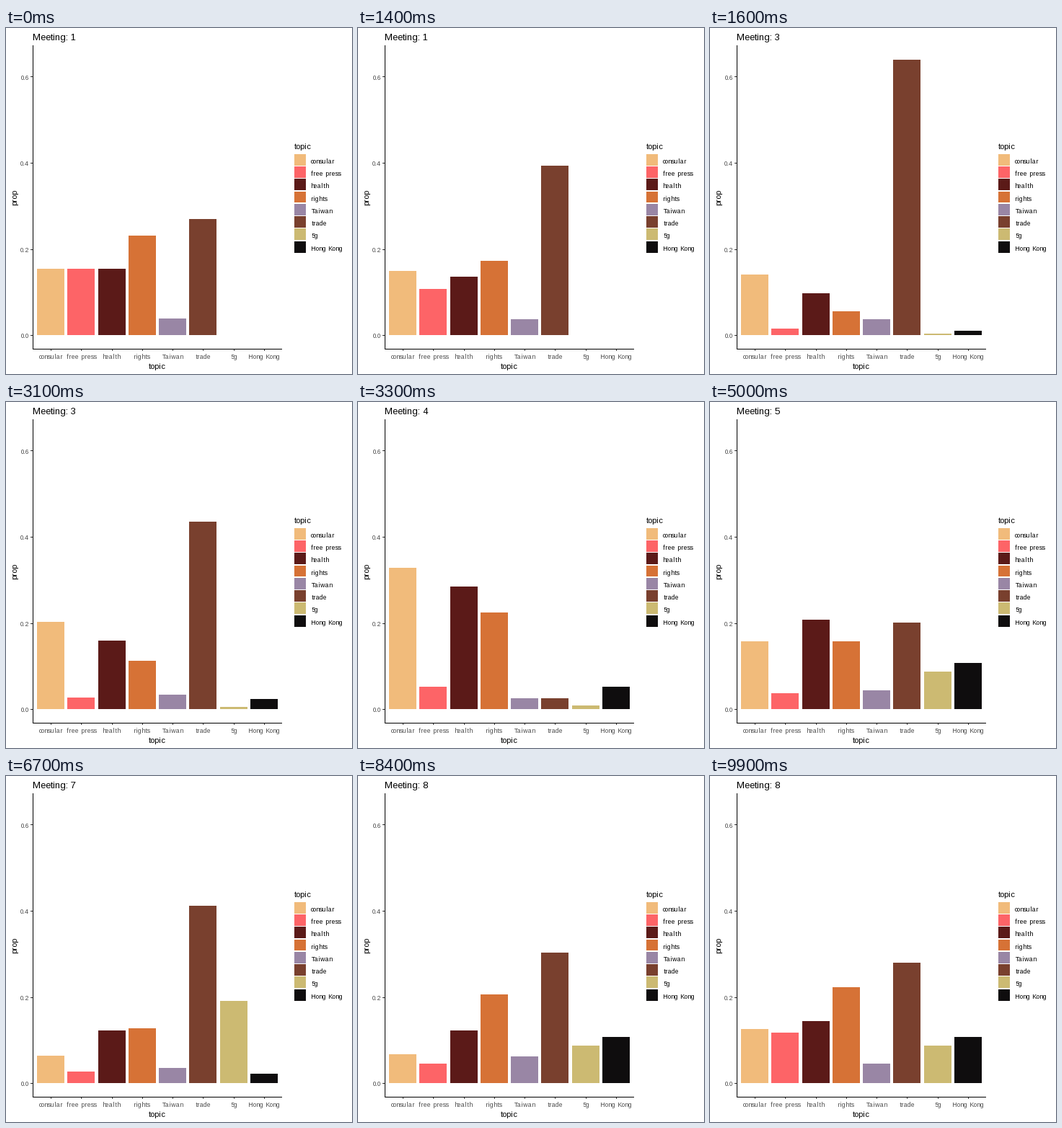
A matplotlib script for the animation above (10000 ms loop, 480x480 px).

```python
import numpy as np
import matplotlib as mpl
import matplotlib.pyplot as plt
from matplotlib.animation import FuncAnimation
from matplotlib.patches import Rectangle

mpl.rcParams.update({
    "toolbar": "None",
    "font.family": "Liberation Sans",
    "text.hinting": "force_autohint",
    "text.hinting_factor": 1,
    "text.kerning_factor": 6,
})

SIZE, DPI = 480, 100
FRAMES, INTERVAL = 100, 100
CYCLE, MOVE = 17, 3           # frames per meeting, frames per transition
ZERO, UNIT = 426.1, 597.7     # pixel row of prop 0, pixels per unit
BASE = round(ZERO)
LEFT, RIGHT, TOP, BOTTOM = 37, 383, 24, 445
FIRST, PITCH, WIDTH = 43.2, 42.24, 38
AXIS_TEXT, TICK = "#4d4d4d", "#333333"

TOPICS = {
    "consular": "#f1bb7b",
    "free press": "#fd6467",
    "health": "#5b1a18",
    "rights": "#d67236",
    "Taiwan": "#9986a5",
    "trade": "#79402e",
    "5g": "#ccba72",
    "Hong Kong": "#0f0d0e",
}

# Shares per thousand; the last topic takes whatever is left.
SHARES = {
    1: (154, 154, 154, 231, 38, 269, 0),
    3: (141, 15, 97, 56, 37, 640, 4),
    4: (328, 52, 284, 224, 26, 26, 8),
    5: (158, 37, 208, 158, 44, 201, 87),
    7: (63, 27, 123, 127, 35, 412, 191),
    8: (67, 45, 123, 206, 62, 303, 87),
}
MEETINGS = list(SHARES)
PROPS = np.array([(*s, 1000 - sum(s)) for s in SHARES.values()]) / 1000

fig = plt.figure(figsize=(SIZE / DPI, SIZE / DPI), dpi=DPI, facecolor="white")
ax = fig.add_axes([0, 0, 1, 1])
ax.set_xlim(0, SIZE)
ax.set_ylim(SIZE, 0)
ax.axis("off")


def box(x, y, w, h, color):
    return ax.add_patch(Rectangle((x, y), w, h, fc=color, lw=0, antialiased=False))


def label(x, y, text, px, color="black", **kw):
    kw.setdefault("va", "baseline")
    return ax.text(x, y, text, fontsize=px * 72 / DPI, color=color, **kw)


bars = []
for i, (topic, color) in enumerate(TOPICS.items()):
    x = FIRST + PITCH * i
    mid = x + WIDTH / 2
    bars.append(box(round(x), BASE, WIDTH, 0, color))
    box(round(mid), BOTTOM + 1, 1, 2, TICK)
    label(mid + 0.3, 459, topic, 9, AXIS_TEXT, ha="center")

    key = 174.8 + 17.28 * i
    top, bottom = round(key), round(key + 15.85)
    box(400, top, 16, bottom - top, color)
    label(423, round(key + 13), topic, 9)

for v in (0, 0.2, 0.4, 0.6):
    y = ZERO - UNIT * v
    box(LEFT - 3, round(y), 3, 1, TICK)
    label(32, round(y + 4.1), f"{v:.1f}", 9, AXIS_TEXT, ha="right")

box(LEFT, TOP, 1, BOTTOM - TOP + 1, "black")
box(LEFT, BOTTOM, RIGHT - LEFT, 1, "black")

title = label(37, 17, "", 13)
label(209.5, 473, "topic", 11, ha="center")
label(400, 168, "topic", 11)
label(17, 235, "prop", 11, rotation=90, ha="right", va="center")


def props_at(frame):
    state = (frame + 1) // CYCLE
    end = min(CYCLE * (state + 1) - 1, FRAMES)
    t = max(0, 1 - (end - frame) / MOVE)
    a, b = PROPS[state], PROPS[(state + 1) % len(PROPS)]
    # A topic missing on either side only switches once the move is over.
    steady = (a == 0) | (b == 0)
    return MEETINGS[state], np.where(steady, a, a + (b - a) * t)


def update(frame):
    meeting, props = props_at(frame)
    title.set_text(f"Meeting: {meeting}")
    for bar, p in zip(bars, props):
        top = round(ZERO - UNIT * p)
        bar.set_y(top)
        bar.set_height(BASE - top)
        bar.set_visible(p > 0)
    return [title, *bars]


anim = FuncAnimation(fig, update, frames=FRAMES, interval=INTERVAL,
                     init_func=lambda: update(0), repeat=True, repeat_delay=0)
plt.show()
```
